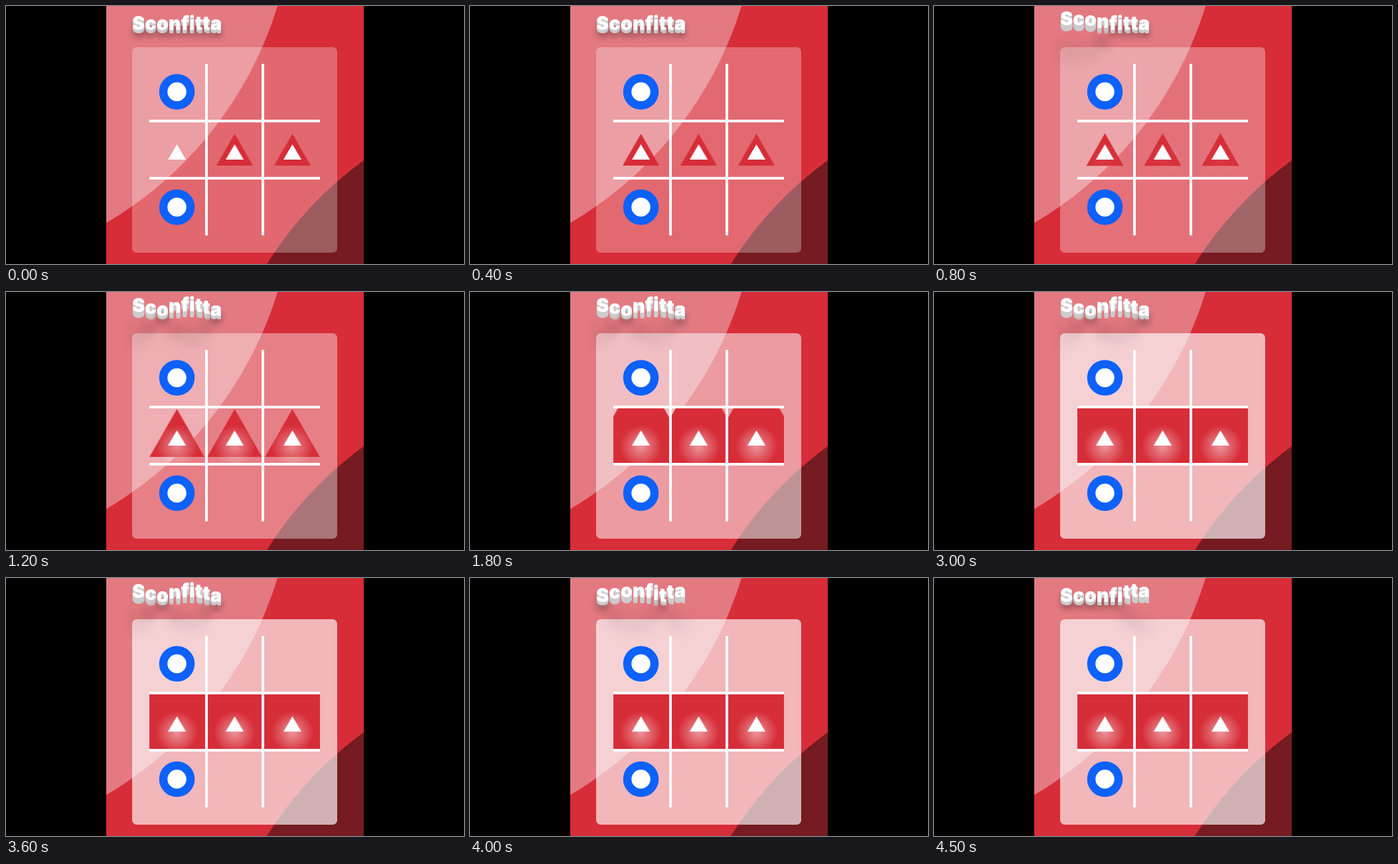
Animation, 690 px wide and 388 px high, one loop 4600 ms. Source, as an HTML page:

```html
<!DOCTYPE html>
<html lang="it">
<head>
<meta charset="utf-8">
<title>Sconfitta</title>
<style>
  html, body { margin: 0; width: 100%; height: 100%; overflow: hidden; background: #000; }
  svg { display: block; }
  .stage { position: absolute; left: 0; top: 0; width: 690px; height: 388px; overflow: hidden; }

  h1 {
    position: absolute; left: 190px; top: 11px; margin: 0;
    font: 900 29px/30px Inter, "Open Sans", sans-serif;
    color: #fff; white-space: nowrap;
  }
  h1 span {
    position: relative; top: 0; display: inline-block;
    text-shadow:
      0 1px 0 #ccc, 0 2px 0 #ccc, 0 3px 0 #ccc, 0 4px 0 #ccc, 0 5px 0 #ccc,
      0 6px 0 transparent, 0 7px 0 transparent, 0 8px 0 transparent, 0 9px 0 transparent,
      0 10px 10px rgba(0, 0, 0, .4);
    animation: bounce .3s ease calc(.42s + var(--i) * .1s) 12 alternate both;
  }
  @keyframes bounce {
    to {
      top: -7px;
      text-shadow:
        0 1px 0 #ccc, 0 2px 0 #ccc, 0 3px 0 #ccc, 0 4px 0 #ccc, 0 5px 0 #ccc,
        0 6px 0 #ccc, 0 7px 0 #ccc, 0 8px 0 #ccc, 0 9px 0 #ccc,
        0 50px 25px rgba(0, 0, 0, .2);
    }
  }

  .panel { fill: #fff; animation: brighten 2.7s cubic-bezier(.37, 0, .63, 1) .2s both; }
  .pop { animation: pop .3s ease both; }
  .grow { fill: #d72d38; animation: grow 1.8s cubic-bezier(.333, 0, .667, .333) .7s both; }
  .glow { animation: show .5s linear .75s both; }
  @keyframes brighten { from { fill-opacity: .28; } to { fill-opacity: .66; } }
  @keyframes pop { from { transform: scale(0); } to { transform: scale(1); } }
  @keyframes grow { from { transform: scale(1); } to { transform: scale(7.5); } }
  @keyframes show { from { opacity: 0; } to { opacity: 1; } }
</style>
</head>
<body>
<div class="stage">
  <svg width="690" height="388" viewBox="0 0 690 388">
    <defs>
      <radialGradient id="halo">
        <stop offset="0" stop-color="#fff" stop-opacity=".5"/>
        <stop offset=".4" stop-color="#fff" stop-opacity=".3"/>
        <stop offset="1" stop-color="#fff" stop-opacity="0"/>
      </radialGradient>
      <clipPath id="board"><path d="M151 0H539V388H151Z"/></clipPath>
    </defs>
    <g clip-path="url(#board)">
      <path d="M151 0H539V388H151Z" fill="#d72d38"/>
      <circle cx="-138.6" cy="-168.3" r="573" fill="#e37981"/>
      <path d="M539 232A573 573 0 0 0 393 388H539Z" fill="#751b21"/>
    </g>
    <rect class="panel" x="190" y="62" width="309" height="309" rx="7"/>
    <g id="row"></g>
    <g fill="#fff" stroke="#0d61fd" stroke-width="12.5">
      <circle cx="257.5" cy="129" r="20.5"/>
      <circle cx="257.5" cy="302.5" r="20.5"/>
    </g>
    <path d="M302 87V345M387 87V345M216 173H473M216 259H473" stroke="#fff" stroke-width="4"/>
  </svg>
  <h1 id="title" aria-label="Sconfitta"></h1>
</div>
<script>
  const LOOP = 4600, STEP = 100;

  document.getElementById('title').innerHTML = [...'Sconfitta']
    .map((c, i) => `<span style="--i:${i}">${c}</span>`).join('');

  // Each nested svg clips its growing triangle to one cell of the middle row.
  const cell = (left, right, cx, cls) => `
    <svg x="${left}" y="173" width="${right - left}" height="84" overflow="hidden">
      <g transform="translate(${cx - left} 51)">
        <g class="${cls}"><path class="grow" d="M0-32L27.5 16H-27.5Z"/></g>
        <circle class="glow" cy="8" r="32" fill="url(#halo)"/>
        <path d="M0-16L13.5 7H-13.5Z" fill="#fff"/>
      </g>
    </svg>`;
  document.getElementById('row').innerHTML =
    cell(216, 300, 257.5, 'pop') + cell(302, 387, 344.5, '') + cell(387, 473, 431.5, '');

  const parts = document.getAnimations();
  parts.forEach(a => a.pause());

  const start = performance.now();
  function draw() {
    const t = (performance.now() - start) % LOOP;
    const held = Math.floor(t / STEP) * STEP;
    parts.forEach(a => { a.currentTime = held; });
    requestAnimationFrame(draw);
  }
  draw();
</script>
</body>
</html>
```
